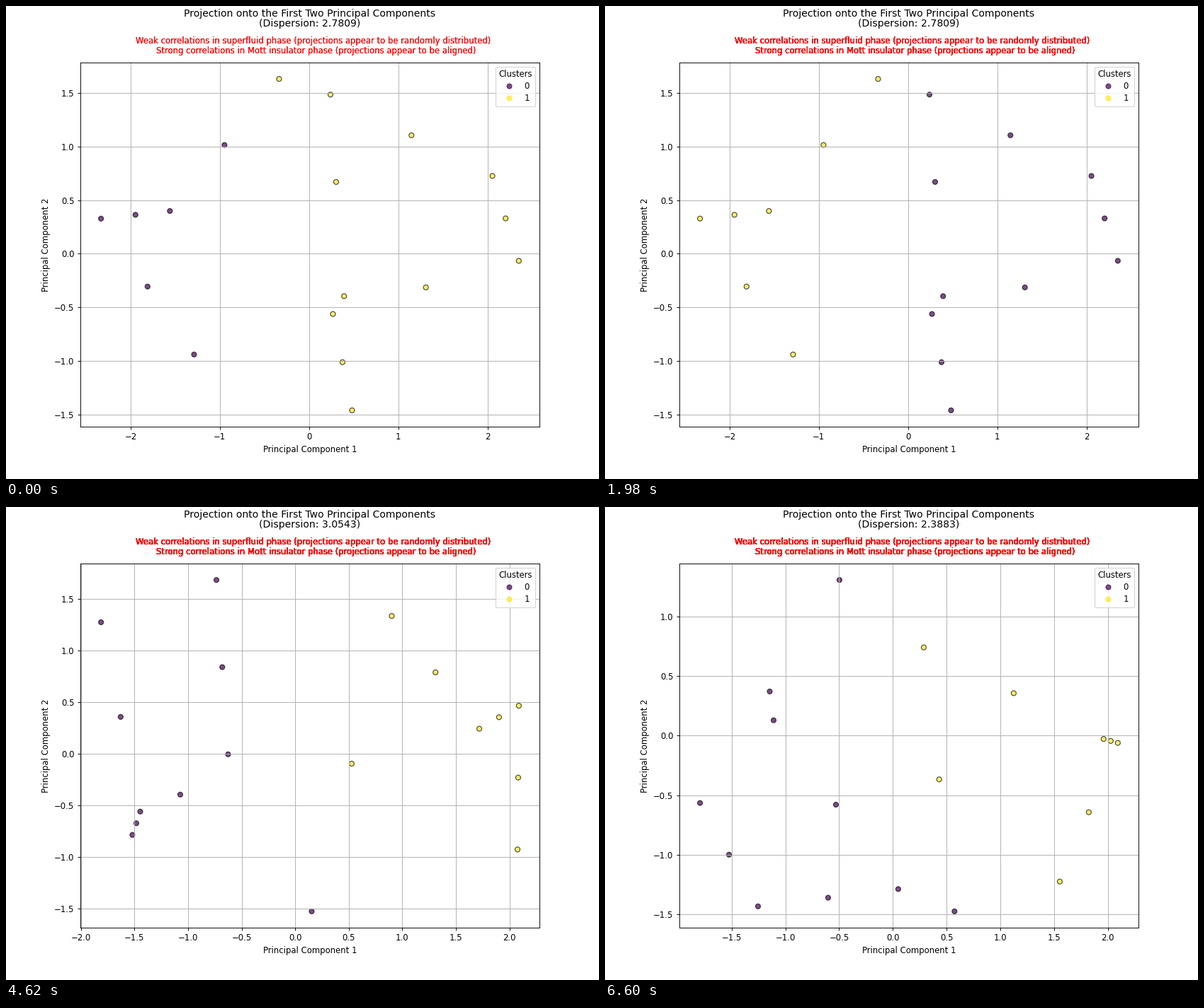
Recreate the animation shown at these times as a matplotlib script. Size 837x669 px, loop 7.26 s.

```python
import numpy as np
import matplotlib.pyplot as plt
from matplotlib.animation import FuncAnimation

W, H = 837, 669
DPI = H / 8
STEP_MS = 660
STEPS_PER_SET = 4

# Dispersion, then the key points of the left and the right strand of dots
SETS = [
    (2.7809,
     [(-1.289, -0.940), (-2.332, 0.328), (-1.560, 0.399), (-0.336, 1.631)],
     [(0.240, 1.485), (2.055, 0.726), (2.351, -0.066), (0.268, -0.562),
      (0.482, -1.461), (0.303, 0.670)]),
    (3.0543,
     [(-0.735, 1.684), (-0.626, -0.006), (-1.519, -0.787), (-1.446, -0.561),
      (-1.812, 1.274)],
     [(0.154, -1.528), (0.901, 1.335), (1.718, 0.242), (2.087, 0.465),
      (2.075, -0.928)]),
    (2.3883,
     [(-0.497, 1.306), (-1.795, -0.565), (-1.255, -1.432), (0.050, -1.287),
      (-1.110, 0.129)],
     [(0.574, -1.474), (0.288, 0.740), (1.962, -0.028), (2.094, -0.061),
      (1.554, -1.224)]),
]

# (size of the left cluster, its label) at each step
SPLITS = [
    (6, 0), (6, 0), (7, 0), (7, 1),
    (18, 0), (9, 1), (9, 0), (10, 0),
    (10, 1), (9, 1), (10, 0),
]

NOTES = [
    (183, 53, "Weak correlations in superfluid phase "
              "(projections appear to be randomly distributed)"),
    (212, 67, "Strong correlations in Mott insulator phase "
              "(projections appear to be aligned)"),
]


def strand(keys):
    """Key points with one more dot halfway between each pair of neighbours."""
    keys = np.array(keys)
    halfway = (keys[1:] + keys[:-1]) / 2
    return np.insert(keys, range(1, len(keys)), halfway, axis=0)


plt.rcParams["font.family"] = "DejaVu Sans"
fig = plt.figure(figsize=(W / DPI + 1e-9, H / DPI), dpi=DPI)
ax = fig.add_axes([0.125, 0.1101, 0.775, 0.7707])

# The notes pile up, one more layer per step, so their edges grow heavier
layers = [
    [fig.text(x / W, 1 - y / H, text, color="red", fontsize=10)
     for x, y, text in NOTES]
    for _ in range(len(SPLITS) + 1)
]


def draw(step):
    dispersion, left, right = SETS[step // STEPS_PER_SET]
    n_left, label = SPLITS[step]
    x, y = np.vstack([strand(left), strand(right)]).T
    clusters = np.where(np.arange(len(x)) < n_left, label, 1 - label)

    ax.clear()
    dots = ax.scatter(x, y, c=clusters, cmap="viridis", edgecolor="k", alpha=0.7)
    ax.set_title("Projection onto the First Two Principal Components\n"
                 f"(Dispersion: {dispersion:.4f})", y=1.084, linespacing=1.0)
    ax.set_xlabel("Principal Component 1")
    ax.set_ylabel("Principal Component 2")
    ax.legend(*dots.legend_elements(), title="Clusters", loc="upper right",
              labelspacing=0.35)
    ax.grid(True)

    for i, layer in enumerate(layers):
        for note in layer:
            note.set_visible(i < step + 2)


anim = FuncAnimation(fig, draw, frames=len(SPLITS), interval=STEP_MS, repeat=True)
plt.show()
```
